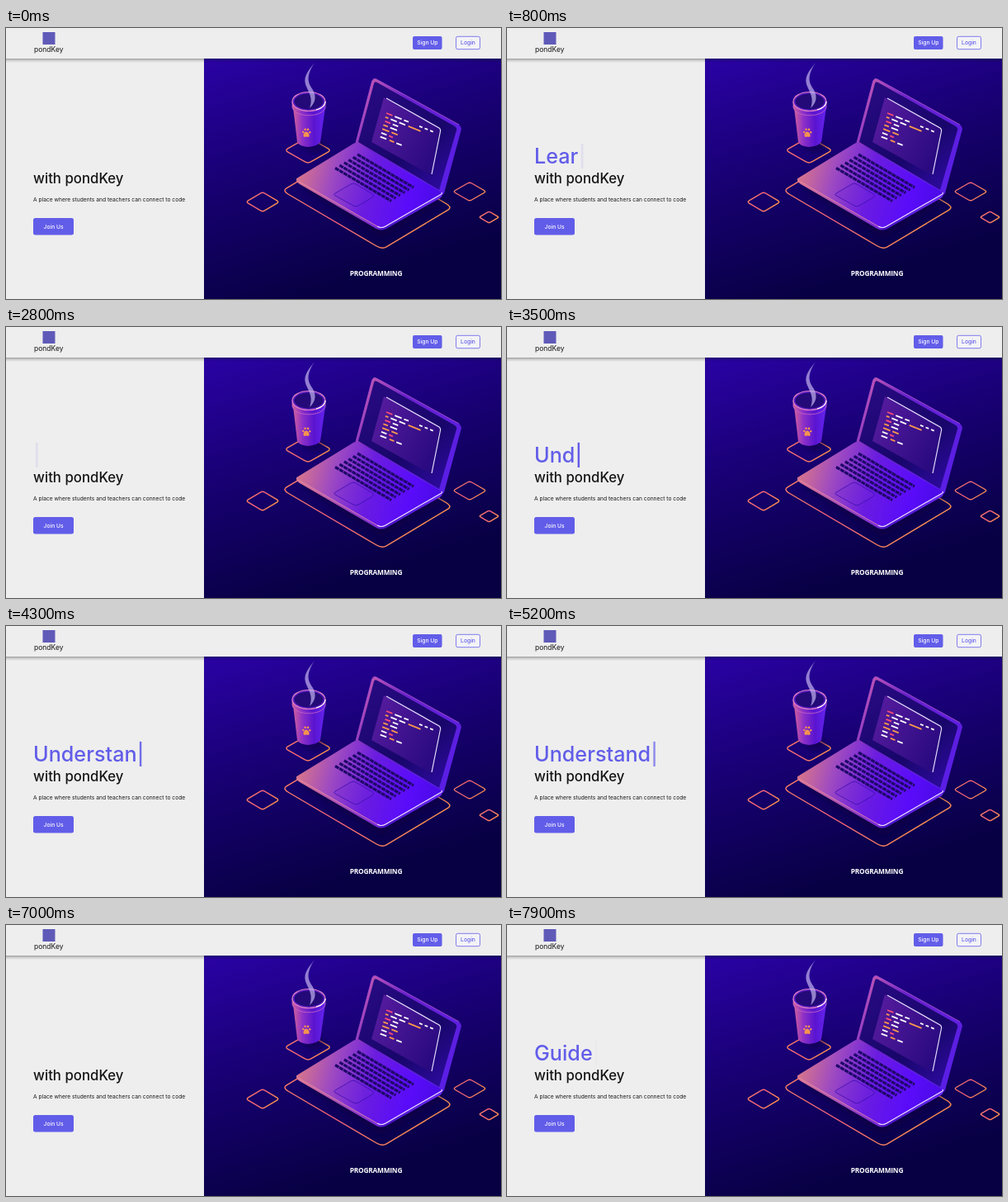
Animation, 600 px wide and 328 px high, one loop 8000 ms. Source, as an HTML page:

```html
<!DOCTYPE html>
<html lang="en">
<head>
<meta charset="utf-8">
<title>Landing page</title>
<style>
  html, body { margin: 0; width: 100%; height: 100%; overflow: hidden; background: #eee; }
  svg { display: block; width: 600px; height: 328px; }
  text { font-family: Inter, sans-serif; font-optical-sizing: none; fill: #161616; white-space: pre; }
  .small { font-size: 6.75px; font-weight: 500; text-anchor: middle; }
  .neon { fill: none; stroke: url(#neon); stroke-width: 1.4; stroke-linejoin: round; }
  .caption { font: 700 8.3px "Open Sans", sans-serif; font-stretch: 75%; text-anchor: middle; letter-spacing: -.2px; fill: #fff; }
</style>
</head>
<body>
<svg viewBox="0 0 600 328">
  <defs>
    <linearGradient id="night" gradientUnits="userSpaceOnUse" x1="300" y1="20" x2="390" y2="320">
      <stop stop-color="#2a02a4"/><stop offset=".5" stop-color="#170070"/><stop offset="1" stop-color="#070042"/>
    </linearGradient>
    <linearGradient id="neon" x1="0" y1="0" x2="1" y2=".4">
      <stop stop-color="#ff8a5c"/><stop offset=".5" stop-color="#f4607a"/><stop offset="1" stop-color="#ff9050"/>
    </linearGradient>
    <linearGradient id="deck" gradientUnits="userSpaceOnUse" x1="358" y1="172" x2="520" y2="215">
      <stop stop-color="#d4728e"/><stop offset=".22" stop-color="#a04cc0"/><stop offset=".5" stop-color="#6a1ce0"/><stop offset=".8" stop-color="#5a0cfa"/><stop offset="1" stop-color="#4c0ae8"/>
    </linearGradient>
    <linearGradient id="edge" gradientUnits="userSpaceOnUse" x1="352" y1="0" x2="528" y2="0">
      <stop stop-color="#e07890"/><stop offset=".55" stop-color="#7a2ad8"/><stop offset=".6" stop-color="#4a12c8"/><stop offset="1" stop-color="#6a28f4"/>
    </linearGradient>
    <linearGradient id="lid" gradientUnits="userSpaceOnUse" x1="432" y1="90" x2="545" y2="160">
      <stop stop-color="#b850b4"/><stop offset=".3" stop-color="#6a22cc"/><stop offset="1" stop-color="#5a1ee4"/>
    </linearGradient>
    <linearGradient id="panel" gradientUnits="userSpaceOnUse" x1="440" y1="80" x2="530" y2="190">
      <stop stop-color="#260a80"/><stop offset=".6" stop-color="#18066a"/><stop offset="1" stop-color="#2c0a9c"/>
    </linearGradient>
    <linearGradient id="window" gradientUnits="userSpaceOnUse" x1="448" y1="110" x2="522" y2="150">
      <stop stop-color="#521a9c"/><stop offset="1" stop-color="#2a0a80"/>
    </linearGradient>
    <linearGradient id="cup">
      <stop stop-color="#d0609c"/><stop offset=".3" stop-color="#8c30c8"/><stop offset=".65" stop-color="#5a14d0"/><stop offset="1" stop-color="#6424f0"/>
    </linearGradient>
    <linearGradient id="shade" x2="0" y2="1">
      <stop stop-opacity=".34"/><stop offset=".4" stop-opacity=".15"/><stop offset="1" stop-opacity="0"/>
    </linearGradient>
    <filter id="soft"><feGaussianBlur stdDeviation="3"/></filter>
  </defs>

  <rect width="600" height="328" fill="#eee"/>
  <rect x="240" y="37" width="360" height="291" fill="url(#night)"/>

  <!-- neon mats and shadows -->
  <g id="mats"></g>
  <path d="M356 192 455 255 530 212 500 190Z" fill="#080040" opacity=".6" filter="url(#soft)"/>
  <path d="M356 143 374 152 390 143 378 134Z" fill="#080040" opacity=".5" filter="url(#soft)"/>

  <!-- cup -->
  <path d="M348 96 353 138Q355 143 366 144Q378 143 381 138L387 96Z" fill="url(#cup)"/>
  <path d="M347 89V96C350 109 384 109 387 96V89Z" fill="url(#cup)" stroke="#c868c4" stroke-width=".8"/>
  <ellipse cx="367" cy="89" rx="20" ry="11.5" fill="#5a1cc0" stroke="#e07fc4" stroke-width="1.2"/>
  <ellipse cx="367" cy="89" rx="17.5" ry="9.500" fill="#230a78"/>
  <path d="M376 99Q387 96 387 89" fill="none" stroke="#fff" stroke-width="1.2"/>
  <g fill="#f5934e">
    <path d="M364 125.5C367 125.5 369 131.5 366.5 132Q364 131.2 361.8 132C359 131.5 361 125.5 364 125.5Z"/>
    <circle cx="360.3" cy="126" r="1.2"/><circle cx="362.6" cy="122.8" r="1.3"/>
    <circle cx="366" cy="122.9" r="1.3"/><circle cx="368.2" cy="126.3" r="1.2"/>
  </g>
  <path d="M374 42C368 50 360 58 363 68C366 77 373 84 368 97C377 89 376 80 370 72C364 63 366 54 374 42Z" fill="#c4b4ef" opacity=".7"/>

  <!-- laptop -->
  <path d="M424 139 443.5 65Q445 60 449 62L549 117Q553 120 551.5 124L531 200Q529 204 525 200Z" fill="url(#lid)"/>
  <path d="M427 138 446 67Q447 64 450 66L544 119Q547 121 546 124L525 196Z" fill="url(#panel)"/>
  <path d="M424 139 443.5 65Q445 60 449 62L549 117" fill="none" stroke="#a850cc" stroke-width=".9"/>
  <path d="M458 84 526 122 515 178 443 138Z" fill="url(#window)"/>
  <path d="M461 85 525 121Q527 122.500 526.500 125L516 177" fill="none" stroke="#e9dcff" stroke-width="1.2"/>
  <g id="code" transform="matrix(.93 .37 -.25 .97 461 103)" stroke-width="1.8"></g>
  <path d="M352 182V185Q353 187 356 189L449 243Q455 246 461 243L526 206Q529 204 529 200Z" fill="url(#edge)"/>
  <path d="M354 181 421 140Q424 138 427 140L526 198Q529 200 526 202L460 240Q455 243 450 240L354 185Q350 183 354 181Z" fill="url(#deck)"/>
  <path d="M354 185 450 240" fill="none" stroke="#e890a8" stroke-width=".8"/>
  <path d="M450 240Q455 243 460 240L526 202Q529 201 528 199" fill="none" stroke="#f2e6ff" stroke-width="1.1"/>
  <g id="keys" stroke="#1e0868" stroke-width="3.2" stroke-dasharray="5.1 .8"></g>
  <path d="M399 200 418 189Q421 187 424 189L444 201Q447 203 444 205L427 215Q424 217 421 215L399 203Q396 201.500 399 200Z" fill="#7428d8" fill-opacity=".35" stroke="#3e0eae" stroke-width=".8"/>

  <text class="caption" x="448.500" y="300.200" style="fill:#fff">PROGRAMMING</text>

  <!-- header -->
  <rect width="600" height="37" fill="#eee"/>
  <rect y="37" width="600" height="5" fill="url(#shade)"/>
  <rect x="44.500" y="5" width="15" height="15" fill="#5f5ab8"/>
  <text x="34" y="29" font-size="8.500">pondKey</text>
  <rect x="493" y="10" width="35.500" height="16" rx="2" fill="#625de9"/>
  <text class="small" x="510.800" y="20.400" style="fill:#fff">Sign Up</text>
  <rect x="545.500" y="10.300" width="29" height="15.400" rx="2" fill="#f3f3f6" stroke="#625de9" stroke-width=".8"/>
  <text class="small" x="560" y="20.400" style="fill:#625de9">Login</text>

  <!-- hero -->
  <text x="33" y="164" font-size="25.200" font-weight="500" style="fill:#625de9"><tspan id="word"></tspan><tspan id="cursor">|</tspan></text>
  <text x="33" y="188" font-size="16.800" font-weight="500">with pondKey</text>
  <text x="33" y="209.800" font-size="6.700">A place where students and teachers can connect to code</text>
  <rect x="33" y="230" width="49" height="20.500" rx="2.500" fill="#625de9"/>
  <text class="small" x="57.600" y="242.700" style="fill:#fff">Join Us</text>
</svg>
<script>
const $ = id => document.getElementById(id);
const line = (x1, y1, x2, y2, color = '') =>
  `<path d="M${x1} ${y1}L${x2} ${y2}"${color && ` stroke="${color}"`}/>`;

// Rounded diamond through left, top, right and bottom corners
function diamond(corners, r = .13) {
  const mix = (a, b, k) => a.map((v, i) => v + (b[i] - v) * k).join(' ');
  const d = corners.map((p, i) => {
    const prev = corners[(i + 3) % 4], next = corners[(i + 1) % 4];
    return `${i ? 'L' : 'M'}${mix(p, prev, r)}Q${p.join(' ')} ${mix(p, next, r)}`;
  }).join('');
  return `<path class="neon" d="${d}Z"/>`;
}
const tile = (x, y, w, h) => diamond([[x - w, y], [x, y - h], [x + w, y], [x, y + h]]);
$('mats').innerHTML =
  diamond([[335, 197], [420, 146], [541, 217], [456, 268]], .06) +
  tile(366, 148, 28, 16) + tile(311, 210.5, 20, 12) + tile(562, 198, 20, 11.5) + tile(585.5, 229, 12, 7);

// Each dash: row, start, length, colour
const pink = '#ff4f78', orange = '#ff9a4a', white = '#fff';
$('code').innerHTML = [
  [0, 0, 8, pink], [0, 11, 9, white], [0, 23, 6, white], [0, 43, 4, white], [0, 50, 4, white], [0, 57, 4, white],
  [1, 0, 4, orange], [1, 7, 8, white], [1, 18, 8, white], [1, 30, 16, orange],
  [2, 1, 7, pink], [2, 11, 7, white],
  [3, 0, 6, orange], [3, 9, 9, white],
  [4, 0, 9, orange], [4, 12, 8, orange],
  [5, 0, 7, white], [5, 10, 5, pink],
  [6, 0, 8, white], [6, 12, 6, orange], [6, 21, 7, white]
].map(([row, x, w, c]) => line(x, row * 4.9, x + w, row * 4.9, c)).join('');

$('keys').innerHTML = Array.from({ length: 6 }, (_, i) => {
  const x = 426 - i * 5.4, y = 153 + i * 3.3;
  return line(x, y, x + 68, y + 40);
}).join('');

// CSS "ease", cubic-bezier(.25, .1, .25, 1)
function ease(x) {
  const bez = (a, b, s) => 3 * a * s * (1 - s) ** 2 + 3 * b * s * s * (1 - s) + s ** 3;
  let lo = 0, hi = 1;
  for (let i = 0; i < 20; i++) {
    const mid = (lo + hi) / 2;
    if (bez(.25, .25, mid) < x) lo = mid; else hi = mid;
  }
  return bez(.1, 1, lo);
}

// Word, first key press, first deletion
const words = [['Learn', 290, 2360], ['Understand', 3150, 6050], ['Guide', 7130, 9000]];
const presses = (t, start, step) => Math.max(0, Math.floor((t - start) / step) + 1);

function typed(t) {
  return words.map(([word, start, erase]) => {
    const count = Math.min(word.length, presses(t, start, 140)) - presses(t, erase, 60);
    return word.slice(0, Math.max(0, count));
  }).join('');
}

function draw(now) {
  const t = Math.floor(now % 8000 / 100) * 100;
  const blink = t % 1000 / 500;
  $('word').textContent = typed(t);
  $('cursor').style.fillOpacity = blink < 1 ? ease(blink) : 1 - ease(blink - 1);
}

const begin = performance.now();
function tick() {
  draw(performance.now() - begin);
  requestAnimationFrame(tick);
}
tick();
</script>
</body>
</html>
```
